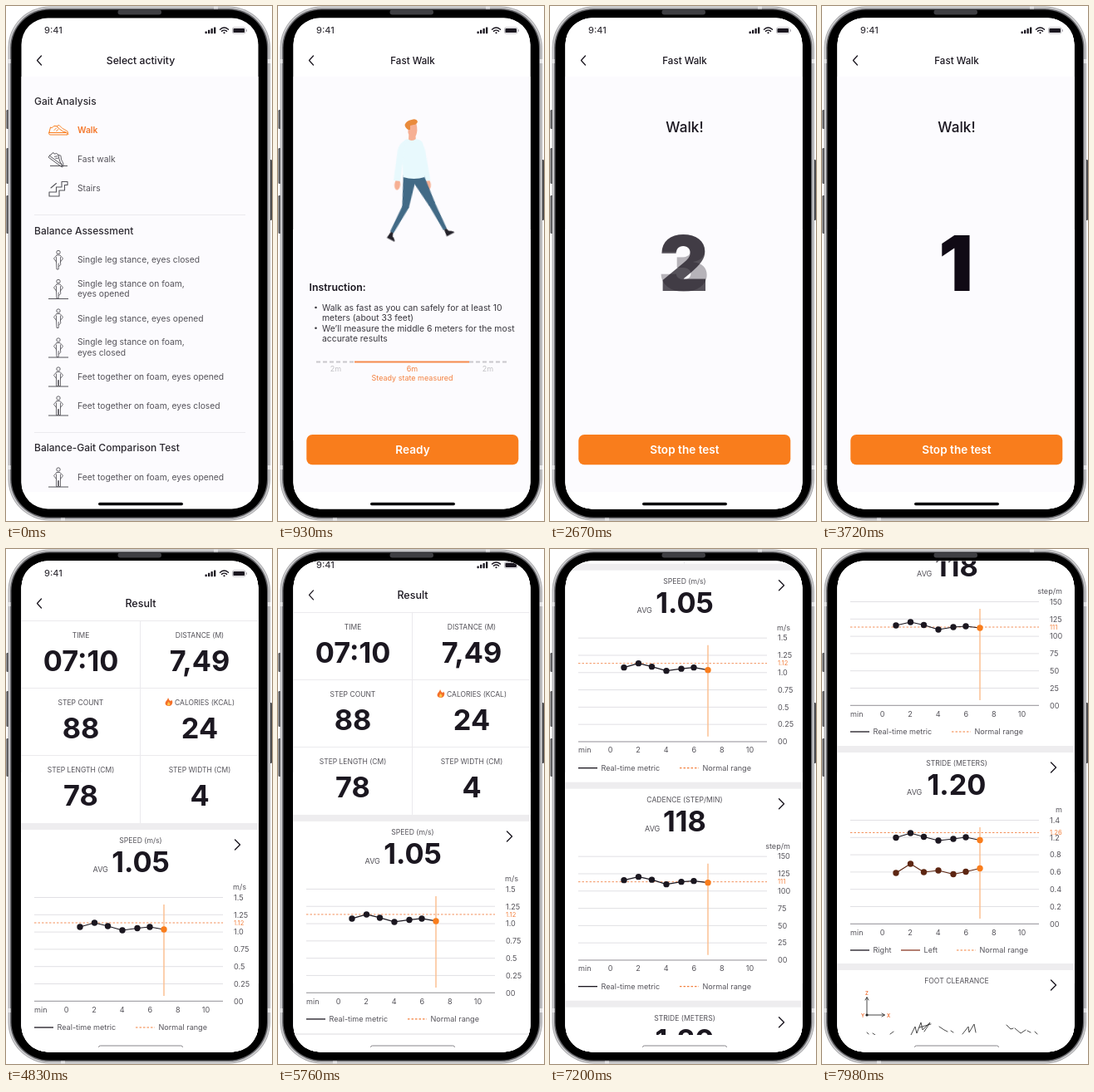
These frames come from a looping animation (320x620 px, 8000 ms). An HTML page:

```html
<!DOCTYPE html>
<html lang="en">
<head>
<meta charset="utf-8">
<title>Gait test</title>
<style>
html, body { margin: 0; width: 100%; height: 100%; overflow: hidden; background: #fff; }
svg { display: block; width: 320px; height: 620px; }
text { font-family: Inter, Roboto, sans-serif; }

.instructions, .countdown, .result, .scroll, .digit { animation: 8s linear infinite; }
.instructions { animation-name: slide-first; }
.countdown { animation-name: dissolve; }
.result { animation-name: slide-result; }
.scroll { animation-name: scroll; }
.three { animation-name: three; }
.two { animation-name: two; }
.one { animation-name: one; }

@keyframes slide-first {
  0%, .375% { transform: translateX(286px); animation-timing-function: ease-out; }
  5.375%, 100% { transform: none; }
}
@keyframes slide-result {
  0%, 50.25% { transform: translateX(286px); animation-timing-function: ease-out; }
  55.25%, 100% { transform: none; }
}
@keyframes dissolve { 0%, 25.5% { opacity: 0; } 29.25%, 100% { opacity: 1; } }
@keyframes three { 0%, 30.75% { opacity: 1; } 34.5%, 100% { opacity: 0; } }
@keyframes two { 0%, 30.75% { opacity: 0; } 34.5%, 38.625% { opacity: 1; } 46.5%, 100% { opacity: 0; } }
@keyframes one { 0%, 38.625% { opacity: 0; } 46.5%, 100% { opacity: 1; } }
@keyframes scroll {
  0%, 68.75% { transform: none; animation-timing-function: cubic-bezier(.333, 0, .667, .406); }
  72% { transform: translateY(-10px); animation-timing-function: cubic-bezier(.333, .141, .667, .54); }
  82.125% { transform: translateY(-141px); animation-timing-function: cubic-bezier(.333, .274, .667, .6); }
  90% { transform: translateY(-312px); animation-timing-function: cubic-bezier(.333, .276, .667, .609); }
  99.75%, 100% { transform: translateY(-619px); }
}

/* Walk cycle: one stride per second */
.hip, .arm { animation: hip .5s cubic-bezier(.37, 0, .63, 1) var(--phase) infinite alternate; }
.arm { animation-name: arm; }
.knee { animation: knee 1s ease-in-out var(--phase) infinite; }
.near { --phase: -123ms; }
.far { --phase: -623ms; }
.hip { transform-origin: 0 0; }
.knee { transform-origin: 0 36px; }
@keyframes hip { from { transform: rotate(9deg); } to { transform: rotate(-29deg); } }
@keyframes arm { from { transform: rotate(var(--back)); } to { transform: rotate(var(--front)); } }
@keyframes knee {
  0%, 100% { transform: rotate(15deg); }
  20% { transform: rotate(48deg); }
  33.3% { transform: rotate(36deg); }
  50%, 85% { transform: rotate(0deg); }
}
</style>
</head>
<body>
<script>
const INK = '#1b1720', GREY = '#55535a', ORANGE = '#f97d1c', ICON = '#55545a';

// Text is placed by its vertical middle
const text = (x, y, str, size, { fill = INK, weight = 400, anchor = 'start' } = {}) =>
  `<text x="${x}" y="${y + size * .363}" font-size="${size}" font-weight="${weight}" fill="${fill}" text-anchor="${anchor}">${str}</text>`;
const middle = (x, y, str, size, opts) => text(x, y, str, size, { anchor: 'middle', ...opts });
const rect = (x, y, w, h, fill, r = 0) =>
  `<rect x="${x}" y="${y}" width="${w}" height="${h}" rx="${r}" fill="${fill}"/>`;
const line = (x1, y1, x2, y2, stroke, width = 1, extra = '') =>
  `<path d="M${x1} ${y1}L${x2} ${y2}" stroke="${stroke}" stroke-width="${width}" ${extra}/>`;
const outline = (d, stroke = INK, width = 1) =>
  `<path d="${d}" fill="none" stroke="${stroke}" stroke-width="${width}" stroke-linecap="round" stroke-linejoin="round"/>`;
const shape = (d, fill) => `<path d="${d}" fill="${fill}"/>`;

const statusBar =
  text(46, 29.5, '9:41', 11, { weight: 500, fill: '#39363d' }) +
  [0, 1, 2, 3].map(i => rect(239.5 + i * 3.5, 30.5 - i * 1.7, 2.3, 2.7 + i * 1.7, INK, .6)).join('') +
  outline('M257.5 28.2q5-4.2 10 0M259.4 30.4q3.1-2.6 6.2 0', INK, 1.4) +
  `<circle cx="262.5" cy="32.3" r="1.1" fill="${INK}"/>` +
  `<rect x="272.4" y="25.9" width="15.6" height="7.2" rx="2" fill="none" stroke="#a5a2aa" stroke-width=".7"/>` +
  rect(273.4, 26.9, 13.6, 5.2, INK, 1.2) + rect(288.8, 28.2, 1.1, 2.6, '#a5a2aa', .5);

const header = (title, size = 12.2) => statusBar +
  outline('M42.5 60L37.5 65.5L42.5 71', INK, 1.3) + middle(162, 65.5, title, size, { weight: 500 });

const plainScreen = (title, body, size) =>
  rect(18, 14, 286, 592, '#fff') + rect(18, 85, 286, 500, '#fcfbfe') + header(title, size) + body +
  rect(111, 597.8, 102, 3.5, '#0b0b0c', 1.7);

const button = label => rect(34.3, 516, 255, 36.3, ORANGE, 7) +
  middle(162, 534.5, label, 13.6, { fill: '#fff', weight: 600 });

// Activity list
const shoe = (color, place) => `<g transform="${place}">` +
  outline('M-11 2.500l1.500-6q2 2 4-1.500l3 0q4 4 8 6.500q5 .5 5.500 4h-21.500q-1.500-1-.5-3zM-11 3h21', color, 1) +
  outline('M-2-5l3-1q4 5 7 5.500q4 1 4 5.500M-5 0l2.500-2.500M-2.500 1l2.500-2', color, .9) + '</g>';

const person = (y, foam, bothLegs) => `<g transform="translate(63 ${y})">` +
  `<circle cy="-9" r="2.200" fill="none" stroke="${ICON}" stroke-width=".9"/>` +
  outline('M-2-5.500h4l3.500 4-3 4M-2-5.500l-3.500 4 3 4M-2.500-3v6M2.500-3v6', ICON, .85) +
  outline(bothLegs ? 'M-2.500 3v8.500h2v-7h1v7h2v-8.500' : 'M-2.500 3l.5 8.500h2.200v-7M2.500 3l.3 3-2.300 2', ICON, .85) +
  (foam ? line(-12, 12, 12, 12, ICON, 1.2) : '') + '</g>';

const row = (y, lines) =>
  lines.map((s, i) => text(86, y + (i - (lines.length - 1) / 2) * 12.5, s, 10.3, { fill: GREY })).join('');
const heading = (y, str) => text(34, y, str, 12, { weight: 500, fill: '#2c2930' });

const stances = [
  [305.5, ['Single leg stance, eyes closed'], 0, 0],
  [340.5, ['Single leg stance on foam,', 'eyes opened'], 1, 0],
  [376, ['Single leg stance, eyes opened'], 0, 0],
  [411, ['Single leg stance on foam,', 'eyes closed'], 1, 0],
  [446, ['Feet together on foam, eyes opened'], 1, 1],
  [481, ['Feet together on foam, eyes closed'], 1, 1],
  [567, ['Feet together on foam, eyes opened'], 1, 1],
];

const selectScreen = plainScreen('Select activity',
  heading(114.5, 'Gait Analysis') + heading(270.5, 'Balance Assessment') +
  heading(531.5, 'Balance-Gait Comparison Test') +
  line(34, 251.5, 288, 251.5, '#ebeaee') + line(34, 513.5, 288, 513.5, '#ebeaee') +
  shoe(ORANGE, 'translate(63 149.500)') + text(86, 149.5, 'Walk', 10.3, { fill: '#f4772a', weight: 600 }) +
  shoe(ICON, 'translate(62 184) rotate(36) scale(.9)') + line(53, 192.5, 74, 192.5, ICON) + row(184.5, ['Fast walk']) +
  outline('M52 224h8.500v-6h6.500v-6.500h7v4h-3.500v6.500h-6.500v7h-12zM54 219l6.500-5.500', ICON, 1.1) + row(219.5, ['Stairs']) +
  stances.map(([y, lines, foam, both]) => person(y, foam, both) + row(y, lines)).join(''));

// Walking figure
const PANTS = '#426a86', SKIN = '#f6b094', SHIRT = '#e8f9fd';

const leg = (side, x) => `<g class="${side}" transform="translate(${x} 206)"><g class="hip">` +
  shape('M-8-2H8Q6 18 4 37H-4Q-6 18-8-2z', PANTS) +
  '<g class="knee">' + shape('M-4 35Q0 32 4 35L2 71H-2.500z', PANTS) +
  shape('M-1.500 71h3l1.500 4q4 1.500 5 4.500h-10.500z', '#24222a') + '</g></g></g>';

const arm = (x, d, hand, back, front) =>
  `<g class="far arm" style="--back:${back}deg;--front:${front}deg;transform-origin:${x}px 168px">` +
  `<ellipse cx="${hand}" cy="215.500" rx="3.500" ry="6.500" fill="${SKIN}"/>` + shape(d, SHIRT) + '</g>';

const walker =
  arm(173, 'M168 162q7 2 8.500 12l3 37h-8z', 176, 18, -6) +
  leg('far', 168) + leg('near', 158.5) +
  shape('M157.500 150h7.500l1 13q-5 4-9 0z', SKIN) +
  shape('M156.500 142h10q2 8-.5 14q-5 4-9.500-3z', SKIN) +
  shape('M152.500 143q2-5 8-6q6-2 7.500 2q-1 4-5 4l-4 1 0 5-2 0q-4-2-4.500-6z', '#e98b3c') +
  shape('M156 160q5 4 10 0q7 1 8.500 6l2 40q-13 4-26 0l-1-39q1-6 6.500-7z', SHIRT) +
  arm(150, 'M153 162q-7 2-8.500 12l-1.500 37h8z', 148, -18, 6);

const note = (x, y, str, fill) => middle(x, y, str, 9, { fill });
const instructionScreen = plainScreen('Fast Walk',
  walker + text(37.5, 338.5, 'Instruction:', 12.3, { weight: 600 }) +
  ['Walk as fast as you can safely for at least 10', 'meters (about 33 feet)',
   'We\u2019ll measure the middle 6 meters for the most', 'accurate results']
    .map((s, i) => text(53, 363 + i * 12.4, s, 10.4, { fill: '#3a383f' })).join('') +
  [363, 387.8].map(y => `<circle cx="45.500" cy="${y}" r="1.300" fill="#3a383f"/>`).join('') +
  line(46, 428.5, 92, 428.5, '#c9c8cc', 1.8, 'stroke-dasharray="5 3"') +
  line(230, 428.5, 276, 428.5, '#c9c8cc', 1.8, 'stroke-dasharray="5 3"') +
  line(92, 428.5, 230, 428.5, '#f58a4c', 1.8) +
  note(69.5, 437, '2m', '#c3c2c6') + note(252.5, 437, '2m', '#c3c2c6') +
  note(161.5, 437, '6m', '#f3813f') + note(161.5, 447.5, 'Steady state measured', '#f3813f') +
  button('Ready'), 11.6);

// Countdown
const countdownScreen = plainScreen('Fast Walk',
  middle(162, 145.5, 'Walk!', 17.2, { weight: 500 }) +
  ['three', 'two', 'one'].map((name, i) =>
    `<g class="digit ${name}">${middle(161, 309.5, 3 - i, 92, { weight: 900, fill: '#100a15' })}</g>`).join('') +
  button('Stop the test'), 11.6);

// Result page
const stat = (x, y, label, value, labelX = x) =>
  middle(labelX, y, label, 8.5, { fill: GREY }) + middle(x, y + 31, value, 34.3, { weight: 700 });
const chevron = y => outline(`M275.500 ${y - 6}l6 6-6 6`, INK, 1.4);
const dashes = 'stroke-dasharray="2.500 2"';
const pointX = [89, 106.5, 122.5, 140, 158, 173, 190];

const curve = (ys, color) => outline('M' + ys.map((y, i) => `${pointX[i]} ${y}`).join('L'), color, 1.2) +
  ys.map((y, i) => `<circle cx="${pointX[i]}" cy="${y}" r="3.700" fill="${i === 6 ? ORANGE : color}"/>`).join('');

const section = (top, label, body) => `<g transform="translate(0 ${top})">` +
  rect(18, 0, 286, 8, '#eeedef') + middle(162, 21, label, 8.6, { fill: GREY }) + chevron(26) + body + '</g>';

function chart(top, { label, value, avgX, unit, ticks, norm, normY, curves }) {
  const small = (x, y, s, opts) => text(x, y, s, 9.1, { fill: GREY, ...opts });
  const two = curves.length > 1, legendX = two ? 162 : 156;
  return section(top, label,
    small(avgX, 56, 'AVG') + middle(162, 47, value, 34.3, { weight: 700 }) +
    small(289, 77, unit, { anchor: 'end' }) +
    ticks.map((s, i) => {
      const y = 89.5 + i * 20.8;
      return line(34, y, 261, y, i === 6 ? '#918f95' : '#e1e0e4') + small(274, y, s);
    }).join('') +
    line(34, normY, 261, normY, '#f3915c', 1, dashes) + text(274, normY, norm, 7.6, { fill: '#f3813f' }) +
    line(190, 98, 190, 208, '#fbc193', 1.5) +
    curves.map((ys, i) => curve(ys, i ? '#5d2612' : INK)).join('') +
    small(34, 224.5, 'min') +
    [0, 2, 4, 6, 8, 10].map(n => small(72.5 + n * 16.8, 224.5, n, { anchor: 'middle' })).join('') +
    line(34, 246, 57, 246, INK, 1.3) + small(61.5, 246, two ? 'Right' : 'Real-time metric') +
    (two ? line(95, 246, 118, 246, '#8c3a26', 1.3) + small(122.5, 246, 'Left') : '') +
    line(legendX, 246, legendX + 23, 246, '#f3813f', 1.2, dashes) + small(legendX + 27.5, 246, 'Normal range'));
}

const axes = outline('M54 62V41M52 44l2-3.500 2 3.500M54 62H75M72 60l3.500 2-3.500 2', '#333', .9) +
  '<circle cx="54" cy="62" r="1.600" fill="#222"/>' +
  [[54, 36, 'Z'], [49, 63, 'Y'], [80, 63, 'X']].map(([x, y, s]) => middle(x, y, s, 5.8, { fill: '#ef6a2c', weight: 600 })).join('');
const traces = outline('M54 83l2 2M61 84l3 2M82 85l4-3M107 86l5-10 2 8 5-13 2 9 9-9-7 11M117 77l14-4M141 76l6 4 4 2M155 81l3 2M169 85l7-9 1 7 6-10 2 10M222 74l5 5 3-1M232 78l7 6 6-4M247 81l4 2M256 82l3 3', '#333', .9);

const resultScreen = rect(18, 14, 286, 592, '#fff') +
  '<g clip-path="url(#page)"><g class="scroll">' + header('Result', 12.5) +
  [86.5, 167.5, 248.5].map(y => line(18, y, 304, y, '#ebeaed')).join('') +
  line(161.5, 86, 161.5, 330, '#ebeaed') +
  stat(90, 103.5, 'TIME', '07:10') + stat(233, 103.5, 'DISTANCE (M)', '7,49') +
  stat(90, 184.5, 'STEP COUNT', '88') + stat(233, 184.5, 'CALORIES (KCAL)', '24', 239) +
  stat(90, 266, 'STEP LENGTH (CM)', '78') + stat(233, 266, 'STEP WIDTH (CM)', '4') +
  shape('M195 179q1 3 3 4q2-1 1-2q2 3 1 5q-1 3-4 3q-4 0-4.500-3q0-2 2-4q1-1 1.500-3z', '#f4702a') +
  shape('M195.500 184q2 2 2 3q-1 2-2.500 1.500q-2-1 .5-4.500z', '#ffc64a') +
  chart(330, {
    label: 'SPEED (m/s)', value: '1.05', avgX: 104.5, unit: 'm/s',
    ticks: ['1.5', '1.25', '1.0', '0.75', '0.5', '0.25', '00'], norm: '1.12', normY: 120,
    curves: [[125, 120, 124, 129, 126.5, 125, 128]],
  }) +
  chart(593, {
    label: 'CADENCE (STEP/MIN)', value: '118', avgX: 114, unit: 'step/m',
    ticks: ['150', '125', '100', '75', '50', '25', '00'], norm: '111', normY: 120,
    curves: [[118, 114, 117.5, 123, 120, 119, 121]],
  }) +
  chart(856, {
    label: 'STRIDE (METERS)', value: '1.20', avgX: 102, unit: 'm',
    ticks: ['1.4', '1.2', '0.8', '0.6', '0.4', '0.2', '00'], norm: '1.26', normY: 104.5,
    curves: [[110.5, 105, 109.5, 114, 112, 110, 113.5], [153, 142, 152, 150, 154.5, 151.5, 147.5]],
  }) +
  section(1118, 'FOOT CLEARANCE', axes + traces) +
  '</g></g>' + outline('M111.500 599.500q0-1.500 2-1.500h97q2 0 2 1.500', '#87858a', 1);

// Phone body
const band = (x, y, w, h) => rect(x, y, w, h, '#e4e4e6');
const phone =
  [[125, 23], [171, 43], [228, 46]].map(([y, h]) => rect(.5, y, 3.5, h, '#4b4b4e', 1.2)).join('') +
  rect(316.5, 185, 3.5, 73, '#4b4b4e', 1.2) +
  rect(2.5, .5, 315.5, 619, '#a9a9ac', 50) + rect(3.5, 1.5, 313.5, 617, '#cfcfd1', 49) +
  rect(5, 3, 310.5, 614, '#6a6a6e', 47.5) + rect(6.5, 4.5, 307.5, 611, '#000', 46) +
  band(250, .5, 5, 3) + band(66, 616.5, 5, 3) +
  [64, 553].map(y => band(2.5, y, 3, 5) + band(315, y, 3, 5)).join('') +
  rect(134.5, 4.5, 52.5, 6, '#3f3f43', 3);

document.body.innerHTML = `<svg viewBox="0 0 320 620">
  <clipPath id="screen"><rect x="18.500" y="14.500" width="285" height="591" rx="32"/></clipPath>
  <clipPath id="page"><rect x="18" y="14" width="286" height="571"/></clipPath>
  ${phone}
  <g clip-path="url(#screen)">
    ${selectScreen}
    <g class="instructions">${instructionScreen}</g>
    <g class="countdown">${countdownScreen}</g>
    <g class="result">${resultScreen}</g>
  </g>
</svg>`;
</script>
</body>
</html>
```
